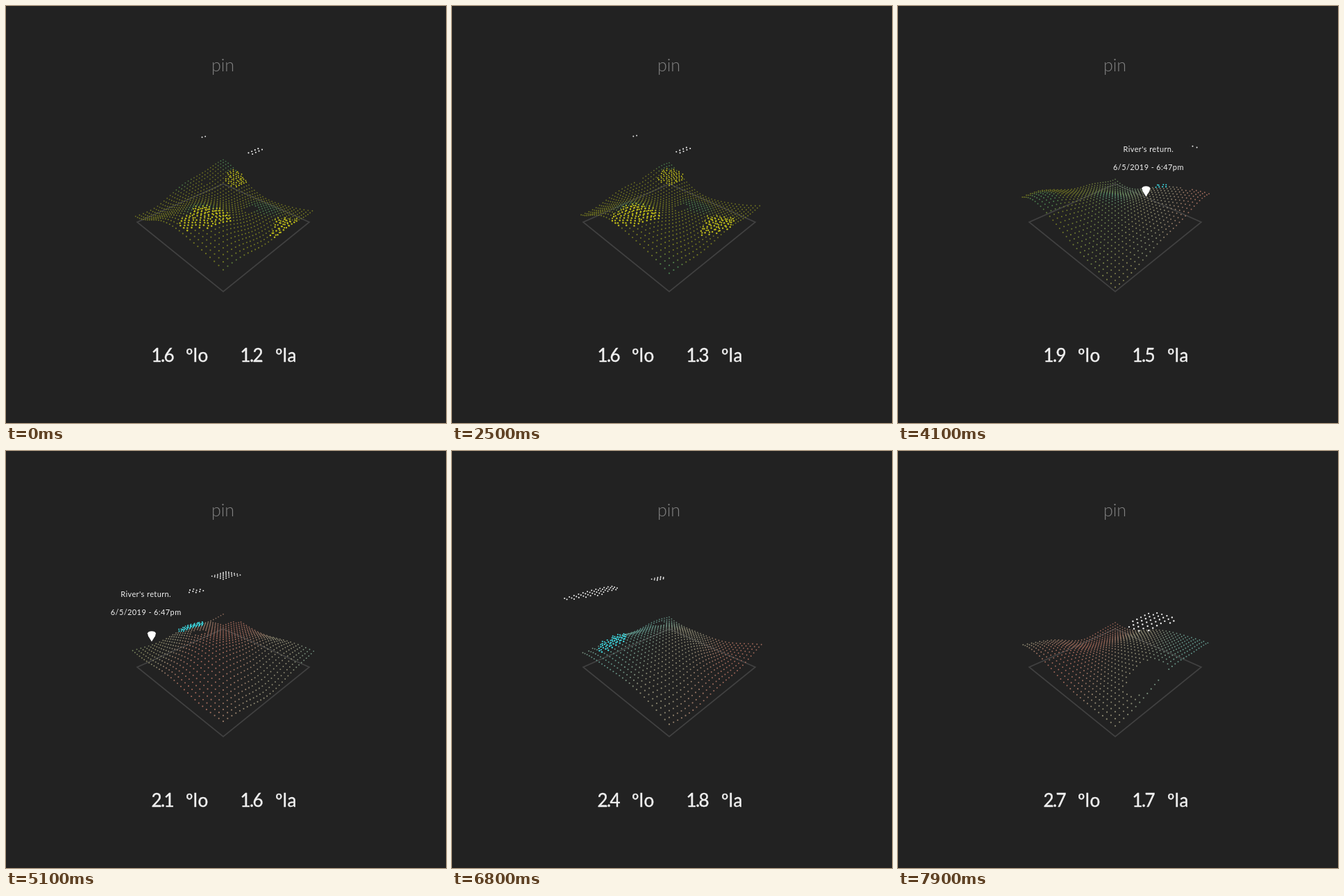
Recreate the animation shown at these times as an HTML page with a canvas. Size 634x600 px, loop 8000 ms.

```html
<!DOCTYPE html>
<html lang="en">
<head>
<meta charset="utf-8">
<title>pin</title>
<style>
  html, body { margin: 0; width: 100%; height: 100%; overflow: hidden; background: #222; }
  canvas, svg { position: absolute; left: 0; top: 0; }
  text { font-family: Lato, "Open Sans", sans-serif; fill: #f0f0f0; }
  .title { font-size: 25px; font-weight: 300; fill: #808080; }
  .value, .unit { font-size: 26px; stroke: #f0f0f0; stroke-width: .4px; }
  .value { letter-spacing: -1.6px; text-anchor: end; }
  .unit { letter-spacing: .4px; }
  .note { font-size: 11px; letter-spacing: .4px; text-anchor: middle; }
</style>
</head>
<body>
<canvas id="land" width="634" height="600"></canvas>
<svg width="634" height="600" viewBox="0 0 634 600">
  <text class="title" x="296" y="94">pin</text>
  <text class="value" id="lo" x="241" y="512"></text>
  <text class="unit" x="259" y="512">ºlo</text>
  <text class="value" id="la" x="369" y="512"></text>
  <text class="unit" x="388" y="512">ºla</text>
  <g id="pin">
    <path id="cone" d="M-6 -12Q-5 -15 0 -15Q5 -15 6 -12L5 -8L0 0L-5 -8Z" fill="#fff"/>
    <g id="label">
      <text class="note" y="209.5">River's return.</text>
      <text class="note" y="236">6/5/2019 - 6:47pm</text>
    </g>
  </g>
</svg>
<script>
const LOOP = 8000, STEP = 100, N = 30, CX = 313, CLOUD_LIFT = 106, PIN_LIFT = 40;
const $ = id => document.getElementById(id);
const ctx = $('land').getContext('2d');

// Scroll of the map: time, east, south.
const SCROLL = [
  [0, 0, 0], [2500, .1, -.06], [2800, .14, -.08], [4100, 1.28, -1], [5100, 1.845, -1.565],
  [5800, 2.25, -1.98], [6800, 2.66, -2.68], [7900, 3.8, -2.25], [8000, 3.9, -2.21]
];

// Patches on the map: x, y, radius.
const CLOUDS = [
  [.64, .33, .045], [.1, .32, .025], [1.96, -1.51, .1], [2.09, -1.04, .05],
  [2.67, -1.88, .13], [2.26, -1.92, .05], [2.76, -2.45, .05], [4.7, -1.62, .1]
];
const TREES = [[.62, .79, .12], [.25, .07, .09], [1, .36, .1]];
const WATER = [[1.84, -1.12, .11], [2.86, -1.87, .09]];
const PIN = [1.92, -.7];

const C = {
  olive: [112, 116, 34], green: [74, 124, 78], tan: [138, 134, 112], pink: [160, 100, 86],
  teal: [92, 146, 136], yellow: [186, 184, 26], cyan: [62, 214, 222], white: [236, 236, 236]
};

const clamp = x => Math.max(0, Math.min(1, x));
const mix = (p, q, k) => p.map((x, i) => x + (q[i] - x) * k);
const hash = n => { const s = Math.sin(n * 127.1) * 43758.5; return s - Math.floor(s); };

function scrollAt(t) {
  const i = SCROLL.findIndex(key => key[0] > t), p = SCROLL[i - 1], q = SCROLL[i];
  return mix(p, q, (t - p[0]) / (q[0] - p[0])).slice(1);
}

// Unit square seen from a corner; h lifts a point towards the eye.
function project(u, v, h) {
  const a = (u + v) / 2, w = 1 - .45 * a - .0013 * h;
  return [CX + (u - v) * 96.1 / w, (256 - 29.95 * a - h) / w, w];
}

const grain = (x, y) => Math.sin(9 * x + 3 * y + 1) + Math.sin(11 * y - 4 * x + 2);
const height = (x, y) =>
  28 - 20 * Math.cos(Math.PI * y) * Math.cos(3.9 * (x - 2.26)) + 2.5 * grain(x, y);

const inside = (list, x, y) => list.some(([px, py, r]) =>
  Math.hypot(x - px, (y - py) / 1.5) < r * (1 + .1 * grain(3 * x, 3 * y)));

// Olive in the west, then bands of pink and teal over tan.
function soil(x, y) {
  const wild = mix(C.olive, C.green, clamp(grain(x, y) - .6));
  const band = Math.cos(Math.PI * (x - y / 2 - 2.85));
  const dry = mix(C.tan, band > 0 ? C.pink : C.teal, clamp(Math.abs(band) * 1.4 - .45));
  return mix(wild, dry, clamp((x - y - 1.7) / 1.1));
}

function dot(u, v, h, color, size) {
  const [x, y, w] = project(u, v, h);
  ctx.fillStyle = `rgb(${color.map(Math.round)})`;
  ctx.beginPath();
  ctx.arc(x, y, size / Math.sqrt(w), 0, 7);
  ctx.fill();
}

function drawFrame() {
  ctx.strokeStyle = '#414141';
  ctx.lineWidth = 1.7;
  ctx.beginPath();
  for (const [u, v] of [[0, 0], [1, 0], [1, 1], [0, 1]]) {
    const [x, y] = project(u, v, 0);
    ctx.lineTo(x, y);
  }
  ctx.closePath();
  ctx.stroke();
}

function drawLand(east, south) {
  for (let i = 0; i < N; i++) for (let j = 0; j < N; j++) {
    const u = i / (N - 1), v = j / (N - 1), x = u + east, y = v + south;
    if (inside(CLOUDS, x, y)) {
      dot(u, v, CLOUD_LIFT + grain(x, y), C.white, .85);
      continue;
    }
    const h = height(x, y);
    const lush = inside(TREES, x, y) ? C.yellow : inside(WATER, x, y) ? C.cyan : null;
    dot(u, v, h, lush || soil(x, y), lush ? 1 : .82);
    if (lush) {
      const r = hash(i * N + j);
      dot(u + (r - .5) * .03, v, h + 2 + 3 * r, lush, .9);
    }
  }
}

function drawPin(east, south) {
  const u = PIN[0] - east, v = PIN[1] - south;
  const on = Math.min(u, v) >= 0 && Math.max(u, v) <= 1;
  $('pin').style.display = on ? '' : 'none';
  if (!on) return;
  const [x, y] = project(u, v, PIN_LIFT);
  $('cone').setAttribute('transform', `translate(${x} ${y})`);
  $('label').setAttribute('transform', `translate(${CX + (x - CX) * 1.08} 0)`);
}

function render(time) {
  const [east, south] = scrollAt(Math.floor(time % LOOP / STEP) * STEP);
  ctx.fillStyle = '#222';
  ctx.fillRect(0, 0, 634, 600);
  drawFrame();
  drawLand(east, south);
  drawPin(east, south);
  $('lo').textContent = (1.56 + .3 * east).toFixed(1);
  $('la').textContent = (1.24 - .22 * south).toFixed(1);
}

const start = performance.now();
function tick() {
  render(performance.now() - start);
  requestAnimationFrame(tick);
}
tick();
</script>
</body>
</html>
```
